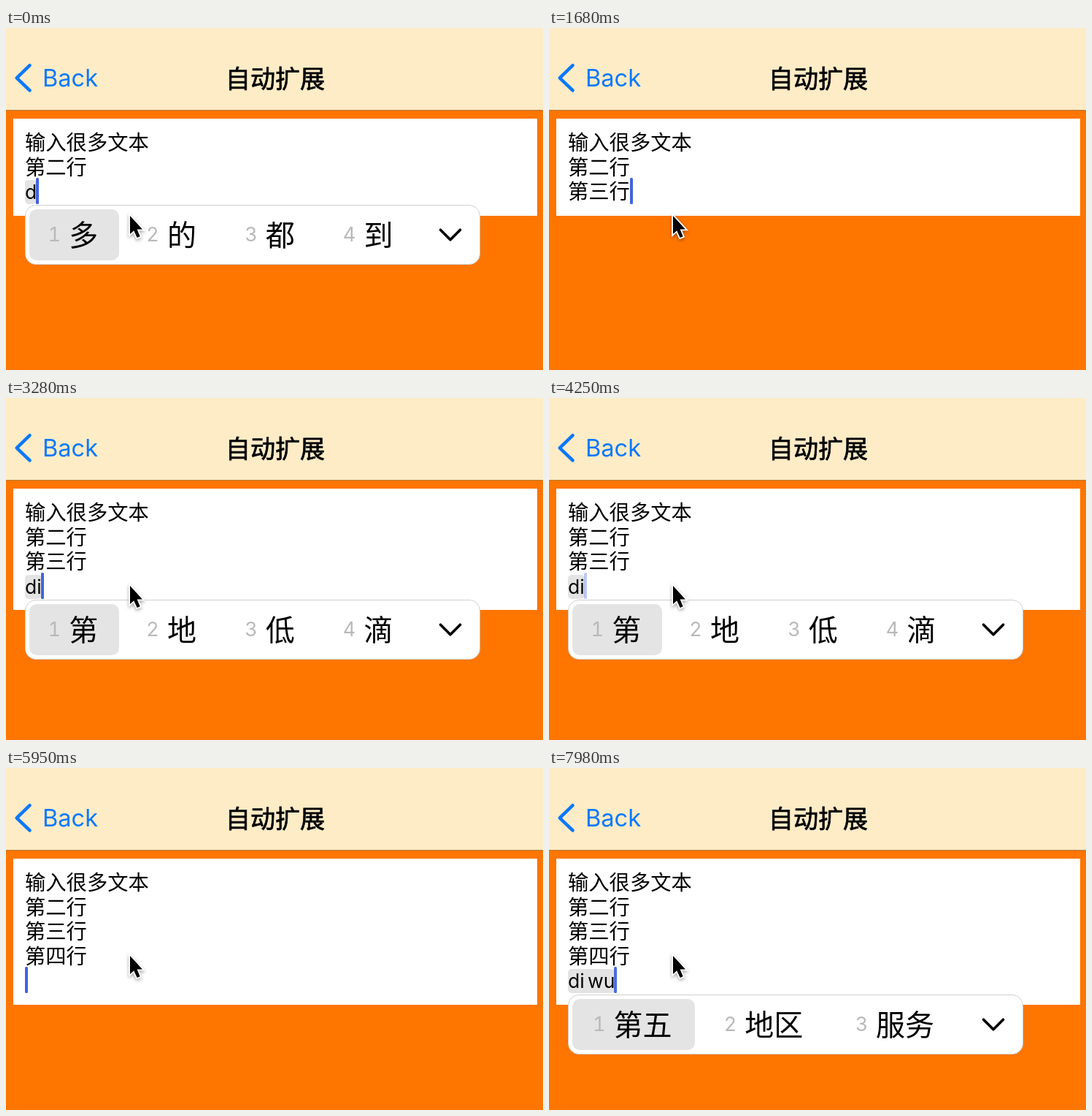
These frames come from a looping animation (736 by 468 pixels, 8 s). An HTML page:

```html
<!DOCTYPE html>
<html lang="zh-CN">
<head>
<meta charset="utf-8">
<style>
  html, body { margin: 0; width: 100%; height: 100%; overflow: hidden; background: #fe7500; }
  body { position: relative; color: #000; font-family: "Noto Sans CJK SC", "Noto Sans CJK", sans-serif; }
  div, svg { position: absolute; }
  .bar { left: 0; top: 0; width: 100%; height: 112px; background: #feecc6; border-bottom: 1px solid #b07c3c; }
  .bar div { top: 42px; line-height: 52px; white-space: nowrap; }
  .bar .back { left: 50px; color: #0a78ff; font: 32.6px/52px Inter, sans-serif; }
  .bar .title { left: 1px; top: 41px; width: 736px; text-align: center; font-size: 34.1px; font-weight: 500;
                -webkit-text-stroke: .7px #000; }
  #field { left: 10px; top: 124px; width: 718px; background: #fff; }
  #text { left: 26px; top: 138px; font-size: 28.3px; line-height: 33.5px; white-space: pre; }
  #mark { position: relative; display: inline-block; font: 26.5px/33px Inter, sans-serif; word-spacing: -3px;
          border-radius: 5px; background: #e3e3e3; }
  #caret { width: 4px; height: 36px; border-radius: 1.5px; background: #4263e0; }
  #popup { left: 26px; width: 622px; height: 80px; border: 1px solid #cfcfcf; border-radius: 15px; background: #fff; }
  #list { left: 5px; top: 5px; width: 527px; height: 70px; display: flex; gap: 12px; }
  #list span { flex: 1 1 auto; display: flex; align-items: flex-start; justify-content: center; padding-right: 3px;
               border-radius: 10px; font-size: 40px; line-height: 67px; white-space: nowrap; }
  #list span:first-child { background: #e4e4e4; }
  #list i { margin-right: 11px; color: #b9b9b9; font: 27px/70px Inter, sans-serif; font-variant-numeric: tabular-nums; }
  svg { left: 0; top: 0; overflow: visible; }
  .stroke { fill: none; stroke-linecap: round; stroke-linejoin: round; }
  #pointer { filter: drop-shadow(0 2px 2px rgba(0, 0, 0, .35)); }
</style>
</head>
<body>
<div class="bar">
  <svg width="50" height="112"><path class="stroke" d="M32.5 51.2 14.7 68.3 32.5 85.4" stroke="#0a78ff" stroke-width="4.6"/></svg>
  <div class="back">Back</div>
  <div class="title">自动扩展</div>
</div>
<div id="field"></div>
<div id="text"><span id="done"></span><span id="mark"></span></div>
<div id="caret"></div>
<div id="popup">
  <div id="list"></div>
  <svg width="622" height="80"><path class="stroke" d="M568.5 33.3 582 46.8 595.5 33.3" stroke="#000" stroke-width="3.7"/></svg>
</div>
<svg id="pointer" width="736" height="468">
  <path d="M170 257V282L175.2 277.2 179.7 287 183.7 285.3 179.6 275.5H187Z" stroke="#fff" stroke-width="3.6" paint-order="stroke"/>
</svg>
<script>
const LOOP = 8000, LINE = 33.5, GROW = 150;
const $ = id => document.getElementById(id);
const field = $('field'), done = $('done'), mark = $('mark'), caret = $('caret'), popup = $('popup'), list = $('list');

const one = '输入很多文本\n第二行\n';
const two = one + '第三行\n';
const three = two + '第四行\n';
const D = '多 的 都 到', DI = '第 地 低 滴', SAN = '第三 第四 第十';

// [time, committed text, letters being composed, candidates]
const steps = [
  [0, one, 'd', D],
  [200, one, 'di', DI],
  [580, one, 'di s', SAN],
  [720, one, 'di sa', SAN],
  [860, one, 'di san', SAN],
  [1050, one, 'di san h', '第三行 第三回 第三'],
  [1170, one + '第三行', '', ''],
  [2235, two, '', ''],
  [3200, two, 'd', D],
  [3240, two, 'di', DI],
  [4580, two, 'di s', SAN],
  [4760, two, 'di si', '第四 地四 低'],
  [5000, two, 'di si h', '第四行 第四回 雕花'],
  [5400, two + '第四行', '', ''],
  [5715, three, '', ''],
  [6490, three, 'd', D],
  [6730, three, 'di', DI],
  [7100, three, 'di w', '第五 定位 地位'],
  [7440, three, 'di wu', '第五 地区 服务']
];

const clamp = x => Math.max(0, Math.min(1, x));
const countLines = text => text.split('\n').length;
const fieldHeight = lines => 133 + (lines - 3) * 33.4;

// Solid after each key, then a soft blink once a second
function caretAlpha(age) {
  const p = age - 510;
  if (p < 0) return 1;
  const q = p % 1000;
  return q < 450 ? (1 + Math.cos(Math.PI * clamp(q / 200))) / 2 : clamp((q - 450) / 150);
}

let shown = -1;
function show(i) {
  const [, text, letters, words] = steps[i];
  const lines = countLines(text);
  done.textContent = text;
  mark.textContent = letters;
  mark.style.display = letters ? '' : 'none';
  popup.style.display = words ? '' : 'none';
  popup.style.top = 242 + (lines - 3) * 34 + 'px';
  list.innerHTML = words.split(' ').map((w, n) => `<span><i>${n + 1}</i>${w}</span>`).join('');

  const tail = document.createRange();
  tail.setStart(done.firstChild, text.lastIndexOf('\n') + 1);
  tail.setEnd(done.firstChild, text.length);
  const width = text.endsWith('\n') ? 0 : tail.getBoundingClientRect().width;
  caret.style.left = 26 + width + (letters ? mark.offsetWidth - 1 : 0) + 'px';
  caret.style.top = 205 + (lines - 3) * LINE + 'px';
  shown = i;
}

function render(t) {
  let i = steps.length - 1;
  while (steps[i][0] > t) i--;
  if (i !== shown) show(i);

  const age = t - steps[i][0];
  caret.style.opacity = caretAlpha(age);

  const now = countLines(steps[i][1]);
  const before = i ? countLines(steps[i - 1][1]) : now;
  const ease = 1 - (1 - clamp(age / GROW)) ** 2;
  field.style.height = fieldHeight(before + (now - before) * ease) + 'px';
}

const start = performance.now();
function tick() {
  render((performance.now() - start) % LOOP);
  requestAnimationFrame(tick);
}
tick();
</script>
</body>
</html>
```
